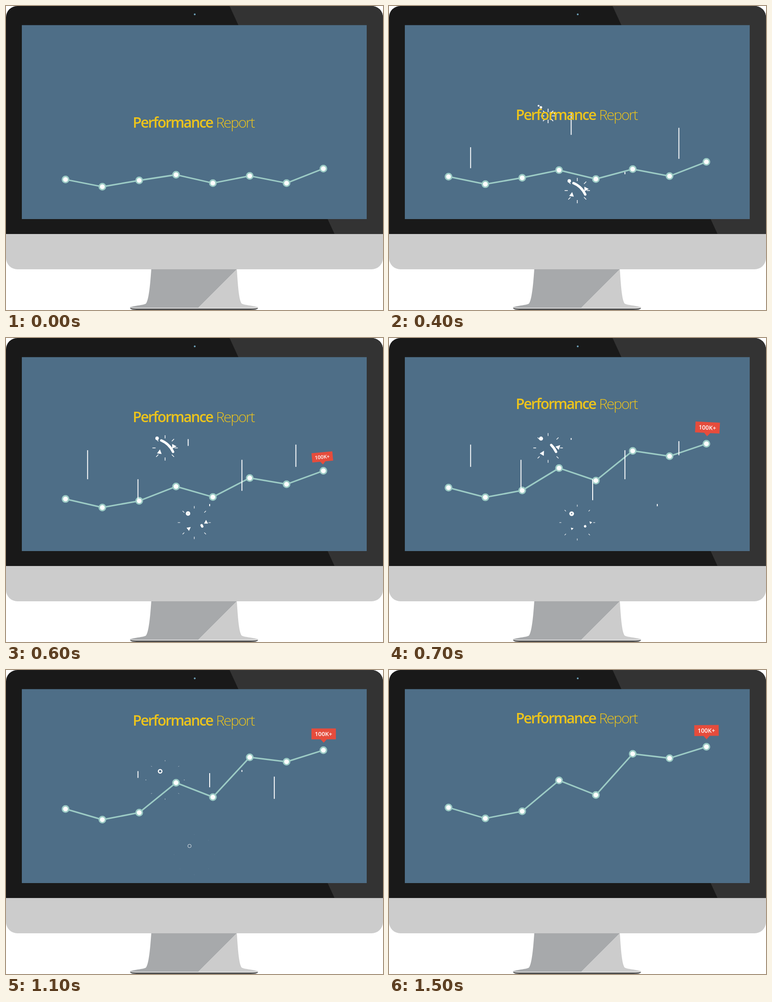
Write an HTML page that moves like this. It is 833x672 px and loops after 2.5 s.

```html
<!DOCTYPE html>
<html lang="en">
<head>
<meta charset="utf-8">
<title>Performance Report</title>
<style>
  html, body { margin: 0; width: 100%; height: 100%; overflow: hidden; background: #fff; }
  svg { display: block; width: 100%; height: 100%; }
  text { font-family: "Open Sans", "Noto Sans", sans-serif; }
  #title { font-size: 32px; fill: #edc41b; letter-spacing: -2.15px; }
  .strong { font-weight: 600; }
  .light { font-weight: 300; }
  #badge text { font-size: 13.2px; font-weight: 600; fill: #fff; text-anchor: middle; }
  #line { fill: none; stroke: #9ccbc5; stroke-width: 3.3; stroke-linejoin: round; }
  #dots circle { fill: #fff; stroke: #9ccbc5; stroke-width: 3.2; }
  #streaks { stroke: #fff; stroke-width: 2; }
  .ray, .arc, .ring { fill: none; stroke: #fff; }
  .arc { stroke-width: 5.4; stroke-linecap: round; }
  .tri { fill: #fff; }
</style>
</head>
<body>
<svg viewBox="0 0 833 672" preserveAspectRatio="none">
  <path fill="#191919" d="M0 504.2V25A25 25 0 0 1 25 0H808A25 25 0 0 1 833 25V504.2Z"/>
  <path fill="#333" d="M494 0H808A25 25 0 0 1 833 25V504.2H726Z"/>
  <path fill="#ccc" d="M0 504.2H833V557A25 25 0 0 1 808 582H25A25 25 0 0 1 0 557Z"/>
  <circle cx="417" cy="18.5" r="2" fill="#6ea3bb"/>
  <path fill="#191919" d="M274 668Q276 671.5 292 671.5H540Q555 671.5 557 668Z"/>
  <path fill="#ddd" d="M274 666H557Q557 669.2 545 669.2H286Q274 669.2 274 666Z"/>
  <path fill="#a7a9ab" d="M321 582C319 610 316 650 309 658C305 661 285 662 274 666V667H425L510 582Z"/>
  <path fill="#ccc" d="M510 582C512 610 514 650 521 658C525 661 546 662 557 666V667H425Z"/>
  <rect x="35" y="42.3" width="762" height="428.7" fill="#4e6e87"/>

  <g id="badge">
    <path fill="#e64c3c" d="M-26.3-48H27.7V-24H7.5L.7-16.5L-6-24H-26.3Z"/>
    <text x=".4" y="-31">100K+</text>
  </g>
  <path id="line"/>
  <g id="dots"></g>
  <g id="streaks"></g>
  <g id="bursts"></g>
  <g id="title"><text class="strong" x="279.9">Performance</text><text class="light" x="464">Report</text></g>
</svg>
<script>
// The picture moves on twos: 15 steps of 100 ms, then a rest
const STEP = 100, LOOP = 2500, LAST = 15;
const $ = id => document.getElementById(id);

function set(el, attrs) {
  for (const key in attrs) el.setAttribute(key, attrs[key]);
}
function add(parent, tag, attrs) {
  const el = parent.appendChild(document.createElementNS("http://www.w3.org/2000/svg", tag));
  set(el, attrs);
  return el;
}
const show = (el, on) => { el.style.display = on ? "" : "none"; };
const mix = (a, b, p) => a + (b - a) * p;
const clamp = u => Math.max(0, Math.min(1, u));

// cubic-bezier(x1, 0, x2, 1), solved by bisection
function easing(x1, x2) {
  return u => {
    let lo = 0, hi = 1, s = .5;
    for (let i = 0; i < 24; i++) {
      s = (lo + hi) / 2;
      const x = 3 * s * (1 - s) * ((1 - s) * x1 + s * x2) + s ** 3;
      if (x < clamp(u)) lo = s; else hi = s;
    }
    return s * s * (3 - 2 * s);
  };
}
const rise = easing(.72, .09), lift = easing(.65, .055);
const whip = easing(.33, 0), smooth = easing(.37, .63), drift = easing(.4, .4);
const easeOut = (u, power) => 1 - (1 - clamp(u)) ** power;

// Chart points: start and end heights
const low = [383.5, 399.5, 385.5, 373, 391.5, 375.5, 391.5, 359.5];
const high = [304, 328, 312.3, 244, 276.3, 185.3, 195, 169.7];
const pointX = i => 131.5 + i * 81.4;
const dots = low.map((_, i) => add($("dots"), "circle", { cx: pointX(i), r: 6.9 }));

// Streaks: x and starting step
const streaks = [[402.5, 0], [640.5, 2], [180.3, 3], [521.3, 4], [291.6, 5], [450, 6], [592.8, 7]]
  .map(([x, from]) => ({ from, el: add($("streaks"), "line", { x1: x, x2: x }) }));

function drawStreak({ el, from }, step) {
  const u = (step - from + 1) / 9;
  show(el, step > 0 && u > 0 && u < 1);
  set(el, { y1: mix(376.5, 220.5, whip(u)), y2: mix(376.5, 220.5, smooth(u)) });
}

// Bursts: centre and starting step
const bursts = [[416, 408, 0], [351.5, 243, 2]].map(([x, y, from]) => {
  const g = add($("bursts"), "g", { transform: `translate(${x} ${y})` });
  const tri = () => add(g, "path", { class: "tri", d: "M0-5.5L5.3 4.5H-5.3Z" });
  return {
    g, from,
    rays: add(g, "path", { class: "ray" }),
    arc: add(g, "path", { class: "arc", d: "M-16-19Q7-13.2 17.6 8.6", pathLength: 100 }),
    ring: add(g, "circle", { class: "ring" }),
    left: tri(), right: tri()
  };
});

function rayPath(inner, outer) {
  let d = "";
  for (let i = 0; i < 8; i++) {
    const c = Math.cos(i * Math.PI / 4), s = Math.sin(i * Math.PI / 4);
    d += `M${c * inner} ${s * inner}L${c * outer} ${s * outer}`;
  }
  return d;
}

function drawBurst(b, step) {
  const a = step - b.from;
  const live = a > 0 && a < 13;
  show(b.g, live);
  if (!live) return;

  set(b.rays, {
    d: rayPath(45 * easeOut((a - .9) / 11, 1.9), 45 * easeOut(a / 12, 2.4)),
    "stroke-width": 2 - a / 7.5
  });

  const tail = 100 * smooth((a - 3) / 3.6), head = 100 * smooth((a - 1.9) / 2.1);
  show(b.arc, a > 1 && a < 8);
  set(b.arc, { "stroke-dasharray": `${Math.max(.1, head - tail)} 300`, "stroke-dashoffset": -Math.min(tail, 99) });

  const way = drift(a / 11), r = 5.3 * Math.sin(Math.PI * a / 15.5), hole = r * clamp((a - 5) / 7.5);
  set(b.ring, { cx: mix(-22, -10.5, way), cy: mix(-22.8, -19, way), r: (r + hole) / 2, "stroke-width": r - hole });

  const size = Math.sin(Math.PI * clamp((a - .8) / 7.6));
  const place = (el, x, y, turn) => set(el, { transform: `translate(${x} ${y}) rotate(${turn}) scale(${size})` });
  place(b.left, -13.5 + a * .35, 14 * easeOut((a - 2) / 6, 2.5) - .5, 22 * a - 80);
  place(b.right, 8 + 3 * a, a - 7.5, 270 - 45 * a);
}

function draw(step) {
  const p = rise(step / LAST);
  const ys = low.map((y, i) => mix(y, high[i], p));
  dots.forEach((dot, i) => set(dot, { cy: ys[i] }));
  set($("line"), { d: "M" + ys.map((y, i) => `${pointX(i)} ${y}`).join("L") });
  set($("title"), { transform: `translate(0 ${mix(268.5, 118, lift(step / LAST))})` });

  // The badge grows and swings like a damped pendulum
  const swing = 7 * Math.exp(-.2 * (step - 9)) * Math.sin(Math.PI * (step - 6.6) / 4.4);
  set($("badge"), { transform: `translate(701.2 ${ys[7]}) rotate(${swing}) scale(${smooth((step - 3) / 4)})` });

  streaks.forEach(s => drawStreak(s, step));
  bursts.forEach(b => drawBurst(b, step));
}

let shown = -1;
function tick() {
  const step = Math.min(LAST, Math.floor(performance.now() % LOOP / STEP));
  if (step !== shown) draw(shown = step);
  requestAnimationFrame(tick);
}
tick();
</script>
</body>
</html>
```
